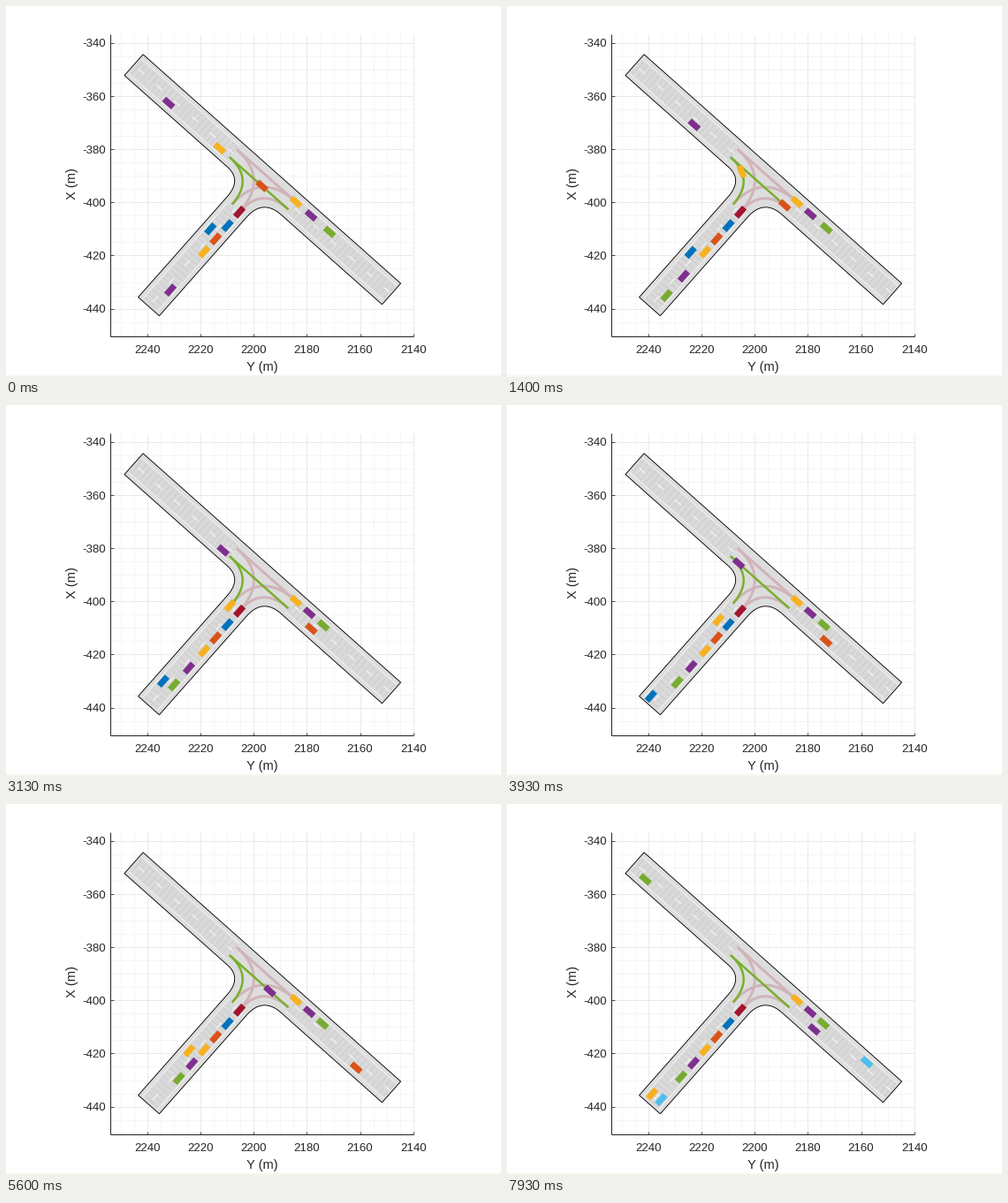
Recreate the animation shown at these times as a matplotlib script. Size 560 by 420 pixels, loop 8 s.

```python
import numpy as np
import matplotlib.pyplot as plt
from matplotlib.animation import FuncAnimation
from matplotlib.collections import LineCollection
from matplotlib.patches import Polygon, Rectangle

W, H, LOOP, FRAMES = 560, 420, 8.0, 120
PT = 0.72  # points per pixel at 100 dpi

BLUE, ORANGE, YELLOW = "#0072bd", "#d95319", "#f7b11f"
PURPLE, GREEN, CYAN, RED = "#7e2f8e", "#77ac30", "#4dbeee", "#a2142f"
INK = "#262626"

plt.rcParams["font.family"] = "Liberation Sans"
fig = plt.figure(figsize=(W / 100, H / 100), dpi=100, facecolor="white")
ax = fig.add_axes([0, 0, 1, 1])
ax.set_xlim(0, W)
ax.set_ylim(H, 0)
ax.axis("off")


def px(y_m):
    return 460.8 - (y_m - 2140) * 3.01


def py(x_m):
    return 41.6 - (x_m + 340) * 3.01


def lines(segments, color, width, z, **kw):
    ax.add_collection(LineCollection(segments, colors=color,
                                     linewidths=width * PT, zorder=z, **kw))


def label(x, y, text, size, ha="center", **kw):
    ax.text(x, y, text, size=size * PT, color=INK, ha=ha, va="center", **kw)


def bezier(a, c, b, n=30):
    t = np.linspace(0, 1, n)[:, None]
    return (1 - t) ** 2 * a + 2 * t * (1 - t) * c + t ** 2 * b


def meet(p, u, q, v):
    """Crossing point of two lines given by point and direction."""
    k = np.linalg.solve(np.column_stack([u, -v]), q - p)
    return p + k[0] * u


# axes, grid and labels
LEFT, RIGHT, TOP, BOTTOM = 118, 461, 31.5, 374


def grid(xs, ys, color, style):
    segs = [[(x, TOP), (x, BOTTOM)] for x in xs]
    segs += [[(LEFT, y), (RIGHT, y)] for y in ys]
    lines(segs, color, 0.8, 1, linestyles=style)


major_x, major_y = range(2140, 2241, 20), range(-440, -339, 20)
grid([px(v) for v in range(2140, 2251, 5) if v % 20],
     [py(v) for v in range(-450, -339, 5) if v % 20], "#dcdcdc", (0, (1, 2)))
grid([px(v) for v in major_x], [py(v) for v in major_y], "#e5e5e5", "solid")
lines([[(LEFT, TOP), (LEFT, BOTTOM)], [(LEFT, BOTTOM), (RIGHT, BOTTOM)]],
      INK, 1, 2)
lines([[(px(v), BOTTOM), (px(v), BOTTOM - 3.5)] for v in major_x]
      + [[(LEFT, py(v)), (LEFT + 3.5, py(v))] for v in major_y], INK, 0.8, 2)
for v in major_x:
    label(px(v), 389.8, str(v), 13.3)
for v in major_y:
    label(112.8, py(v) + 1.8, str(v), 13.3, ha="right")
label(290, 409, "Y (m)", 14.67)
label(75.5, 201.5, "X (m)", 14.67, rotation=90)
ax.add_patch(Rectangle((0, 418), W, 2, color="#f1f7ee", lw=0))

# road frames: origin, direction, right-hand normal
M0, M1 = np.array([144.5, 66.7]), np.array([436.0, 325.95])
S0 = np.array([161.5, 340.2])
MLEN = np.hypot(*(M1 - M0))
U = (M1 - M0) / MLEN
N = np.array([-U[1], U[0]])
V = np.array([0.6625, -0.749])
V /= np.hypot(*V)
R = np.array([-V[1], V[0]])
J1, J2, JS = 150.5, 239.5, 149.0  # where the junction begins and ends
HALF, LANE = 15.9, 6.0


def main(s, d):
    return M0 + s * U + d * N


def side(s, d):
    return S0 + s * V + d * R


corner_l = meet(main(0, HALF), U, side(0, -HALF), V)
corner_r = meet(main(0, HALF), U, side(0, HALF), V)
outline = np.vstack([
    main(0, -HALF), main(MLEN, -HALF), main(MLEN, HALF),
    bezier(corner_r + 27.5 * U, corner_r, corner_r - 28 * V),
    side(0, HALF), side(0, -HALF),
    bezier(corner_l - 25.5 * V, corner_l, corner_l - 22 * U),
    main(0, HALF)])
ax.add_patch(Polygon(outline, fc="#dddddd", ec="black", lw=0.9 * PT,
                     zorder=3))

# lane surface, cross lines and markings on each arm
for at, a, b in ((main, 2, J1), (main, J2, MLEN - 2), (side, 2, JS)):
    band = [at(a, -11), at(b, -11), at(b, 11), at(a, 11)]
    ax.add_patch(Polygon(band, fc="#d9d9d9", lw=0, zorder=4))
    lines([[at(s, -9.5), at(s, 9.5)] for s in np.arange(a + 3, b, 6)],
          "#cacaca", 0.8, 5)
    lines([[at(a, d), at(b, d)] for d in (-11, 11)], "#efefef", 1.1, 5)
    lines([[at(s, 0), at(min(s + 9, b), 0)] for s in np.arange(a + 5, b, 27)],
          "#f6f6f6", 1.2, 6)

# turning paths through the junction
a_in, a_out = main(J1, LANE), main(J2, LANE)
b_in, b_out = main(J2, -LANE), main(J1, -LANE)
s_in, s_out = side(JS, LANE), side(JS, -LANE)


def turn(p, u, q, v):
    return bezier(p, meet(p, u, q, v), q)


right_turn = turn(a_in, U, s_out, V)
lines([[b_in, b_out], turn(s_in, V, b_out, U), turn(b_in, U, s_out, V),
       turn(s_in, V, a_out, U)], "#d0b4b9", 3, 7)
lines([[a_in, a_out], right_turn], "#78b02c", 2.5, 8)


class Track:
    def __init__(self, *parts):
        self.pts = np.vstack(parts)
        step = np.hypot(*np.diff(self.pts, axis=0).T)
        self.cum = np.concatenate([[0], np.cumsum(step)])

    def at(self, s):
        return np.array([np.interp(s, self.cum, c) for c in self.pts.T])

    def box(self, s, length=13.8, width=6.9):
        p = self.at(s)
        d = self.at(s + 3) - self.at(s - 3)
        d = d / np.hypot(*d) * length / 2
        n = np.array([-d[1], d[0]]) * width / length
        return [p + d + n, p + d - n, p - d - n, p - d + n]


down = Track(main(0, LANE), main(MLEN, LANE))
up = Track(main(0, -LANE), main(MLEN, -LANE))
into = Track(side(0, LANE), side(170, LANE))
away = Track(side(JS, -LANE), side(0, -LANE))
turning = Track(main(0, LANE), right_turn[:-1], s_out, side(0, -LANE))


def parked(s):
    return lambda t: s


def drive(s, v, acc=0.0, t0=0.0):
    return lambda t: s + v * (t - t0) + acc * (t - t0) ** 2


def brake(stop, gap, rate, t0=0.0):
    return lambda t: stop - gap * np.exp(-rate * (t - t0))


# track, colour, distance rule, first and last moment on the road
CARS = [
    (down, PURPLE, drive(58.2, 26.3, 0.19), 0, 9),
    (down, ORANGE, drive(199.4, 23, 0.442), 0, 7.3),
    (turning, YELLOW, drive(135.2, 25.36, 0.247), 0, 9),
    (away, BLUE, drive(37, 24.6, 0.54), 0, 4.3),
    (into, RED, parked(148), 0, 9),
    (into, BLUE, parked(127.6), 0, 9),
    (into, ORANGE, parked(107.5), 0, 9),
    (into, YELLOW, parked(87.8), 0, 9),
    (into, PURPLE, brake(68.4, 38.2, 0.57), 0, 9),
    (into, GREEN, brake(48, 37.4, 0.49, 0.67), 0.59, 9),
    (into, CYAN, drive(13.9, 20, 0, 7.93), 7.66, 9),
    (up, YELLOW, parked(240.2), 0, 9),
    (up, PURPLE, brake(260.4, -2.7, 1.5), 0, 9),
    (up, GREEN, brake(280.2, -11, 0.62), 0, 9),
    (up, CYAN, drive(379.4, -23.8, 0, 6.47), 6.39, 9),
    (down, GREEN, drive(23, 26, 0, 7.93), 7.52, 9),
]
bodies = [ax.add_patch(Polygon(np.zeros((4, 2)), fc=color, lw=0, zorder=10))
          for _, color, *_ in CARS]


def update(i):
    t = i * LOOP / FRAMES
    for body, (track, _, rule, start, end) in zip(bodies, CARS):
        on = start <= t < end
        body.set_visible(on)
        if on:
            body.set_xy(track.box(rule(t)))
    return bodies


anim = FuncAnimation(fig, update, frames=FRAMES,
                     interval=LOOP * 1000 / FRAMES,
                     init_func=lambda: update(0), repeat=True, repeat_delay=0)
plt.show()
```
